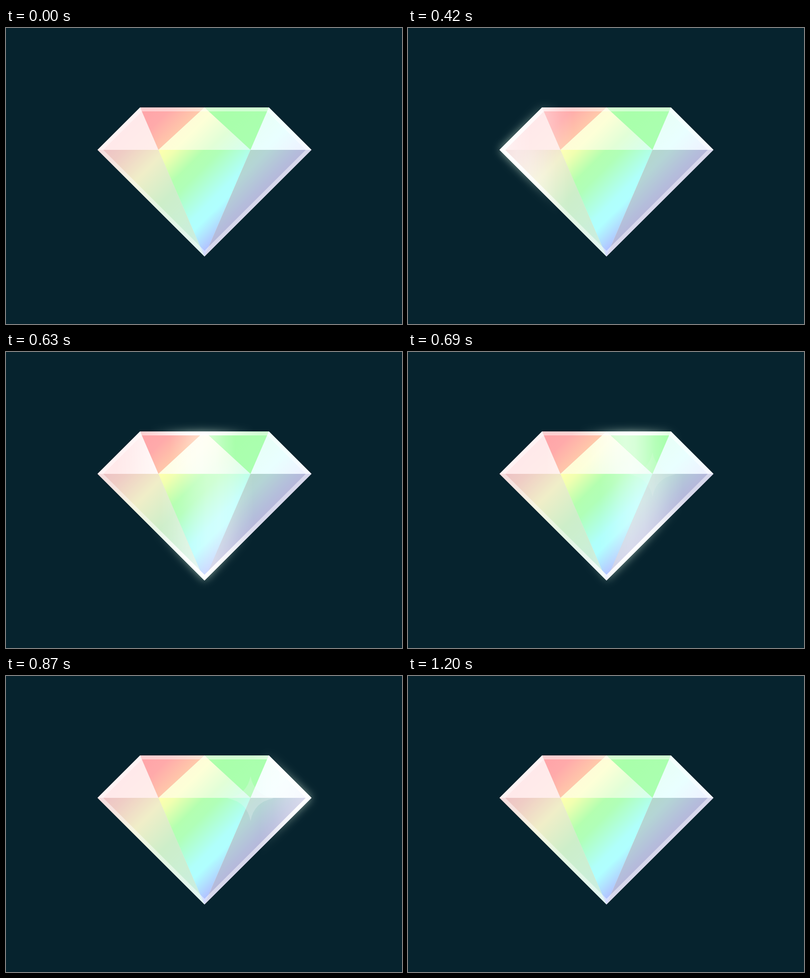
These frames come from a looping animation (800x600 px, 2.9 s). An HTML page with a canvas:

```html
<!DOCTYPE html>
<html lang="en">
<head>
<meta charset="utf-8">
<title>Shining diamond</title>
<style>
  html, body { margin: 0; width: 100%; height: 100%; overflow: hidden; background: #06232e; }
  canvas { display: block; }
</style>
</head>
<body>
<canvas id="stage" width="800" height="600"></canvas>
<script>
const ctx = document.getElementById('stage').getContext('2d');
const LOOP = 2900, STEP = 30, START = 300, END = 1200;

const topLeft = [271, 161], topMid = [401, 161], topRight = [531, 161];
const left = [185, 247], innerLeft = [308, 247], innerRight = [494, 247];
const right = [617, 247], tip = [401, 463];

function polygon(points) {
  const path = new Path2D();
  points.forEach(([x, y]) => path.lineTo(x, y));
  path.closePath();
  return path;
}

// Diagonal gradient; stops are positions from the upper left to the lower right edge.
function diagonal(stops) {
  const gradient = ctx.createLinearGradient(216, 216, 432, 432);
  stops.forEach(([at, color]) => gradient.addColorStop(at, color));
  return gradient;
}

// Soft vertical strip of white light.
function band(center, halfWidth, strength) {
  const gradient = ctx.createLinearGradient(center - halfWidth, 0, center + halfWidth, 0);
  for (let i = 0; i <= 8; i++) {
    const alpha = strength * Math.sin(Math.PI * i / 8) ** 1.5;
    gradient.addColorStop(i / 8, `rgba(255,255,255,${alpha.toFixed(4)})`);
  }
  return gradient;
}

// Each facet catches the light with its own offset and strength.
function facet(points, stops, offset, halfWidth, strength) {
  return { path: polygon(points), fill: diagonal(stops), offset, halfWidth, strength };
}

const facets = [
  facet([topLeft, left, innerLeft],
    [[0, '#ffe8ea'], [0.28, '#ffeeea']], -62, 112, 0.72),
  facet([topLeft, topMid, innerLeft],
    [[0.05, '#ffa5a9'], [0.15, '#ffaaaa'], [0.3, '#ffcaaa']], 35, 100, 0.5),
  facet([topMid, innerRight, innerLeft],
    [[0.27, '#fffbd7'], [0.36, '#fdffd7'], [0.52, '#e2ffd7'], [0.7, '#d7fff0']], 0, 115, 0.75),
  facet([topMid, topRight, innerRight],
    [[0.3, '#b4ffaa'], [0.42, '#a9ffaa'], [0.7, '#aaffb0']], -12, 80, 0.6),
  facet([topRight, right, innerRight],
    [[0.6, '#e8fff6'], [0.78, '#e9ffff'], [1, '#efefff']], -60, 112, 0.68),
  facet([left, innerLeft, tip],
    [[0.03, '#edc3c4'], [0.13, '#efcdc5'], [0.32, '#f0eec8'], [0.55, '#cdeec9'],
     [0.72, '#cbefd3'], [1, '#c9ece8']], 20, 105, 0.58),
  facet([innerLeft, innerRight, tip],
    [[0.29, '#ffffaf'], [0.36, '#f1ffb0'], [0.5, '#b4ffb0'], [0.58, '#b0ffb8'],
     [0.77, '#b0fffb'], [0.83, '#b0ffff'], [1, '#b2b8ff']], 35, 100, 0.42),
  facet([innerRight, right, tip],
    [[0.7, '#b4d8cb'], [0.8, '#b4d5d5'], [0.93, '#b4bedb'], [1, '#b7b5db']], 0, 105, 0.48)
];

const outline = polygon([topLeft, topRight, right, tip, left]);
const star = new Path2D(
  'M494 203 Q501 241 541 248 Q501 255 494 294 Q487 255 447 248 Q487 241 494 203Z');

// Steady sweep that slows down once it has reached the right corner.
function lightX(t) {
  return t < 870 ? 200 + 0.93 * (t - 420) : 618 + 150 * (1 - Math.exp((870 - t) / 160));
}

function starAlpha(t) {
  return Math.max(0, t < 780 ? (t - 660) / 200 : 0.6 - (t - 780) / 273);
}

function drawGlow(x) {
  ctx.save();
  ctx.shadowColor = 'rgba(226,250,226,0.62)';
  ctx.shadowBlur = 18;
  ctx.fillStyle = band(x, 105, 1);
  ctx.fill(outline);
  ctx.restore();
}

function drawBorder(x, shining) {
  ctx.save();
  ctx.clip(outline);
  ctx.lineWidth = 16;
  ctx.strokeStyle = 'rgba(255,255,255,0.45)';
  ctx.stroke(outline);
  if (shining) {
    ctx.strokeStyle = band(x, 120, 0.95);
    ctx.stroke(outline);
  }
  ctx.restore();
}

function draw(t) {
  const shining = t >= START && t < END;
  const x = lightX(t);
  ctx.fillStyle = '#06232e';
  ctx.fillRect(0, 0, 800, 600);
  if (shining) drawGlow(x);

  ctx.fillStyle = '#e0f0e0';
  ctx.fill(outline);
  for (const f of facets) {
    ctx.fillStyle = f.fill;
    ctx.fill(f.path);
    if (!shining) continue;
    ctx.fillStyle = band(x + f.offset, f.halfWidth, f.strength);
    ctx.fill(f.path);
  }
  drawBorder(x, shining);

  if (shining) {
    ctx.globalAlpha = starAlpha(t);
    ctx.fillStyle = '#f0f5f2';
    ctx.fill(star);
    ctx.globalAlpha = 1;
  }
}

const begin = performance.now();
function tick() {
  const t = (performance.now() - begin) % LOOP;
  draw(Math.floor(t / STEP) * STEP);
  requestAnimationFrame(tick);
}
tick();
</script>
</body>
</html>
```
